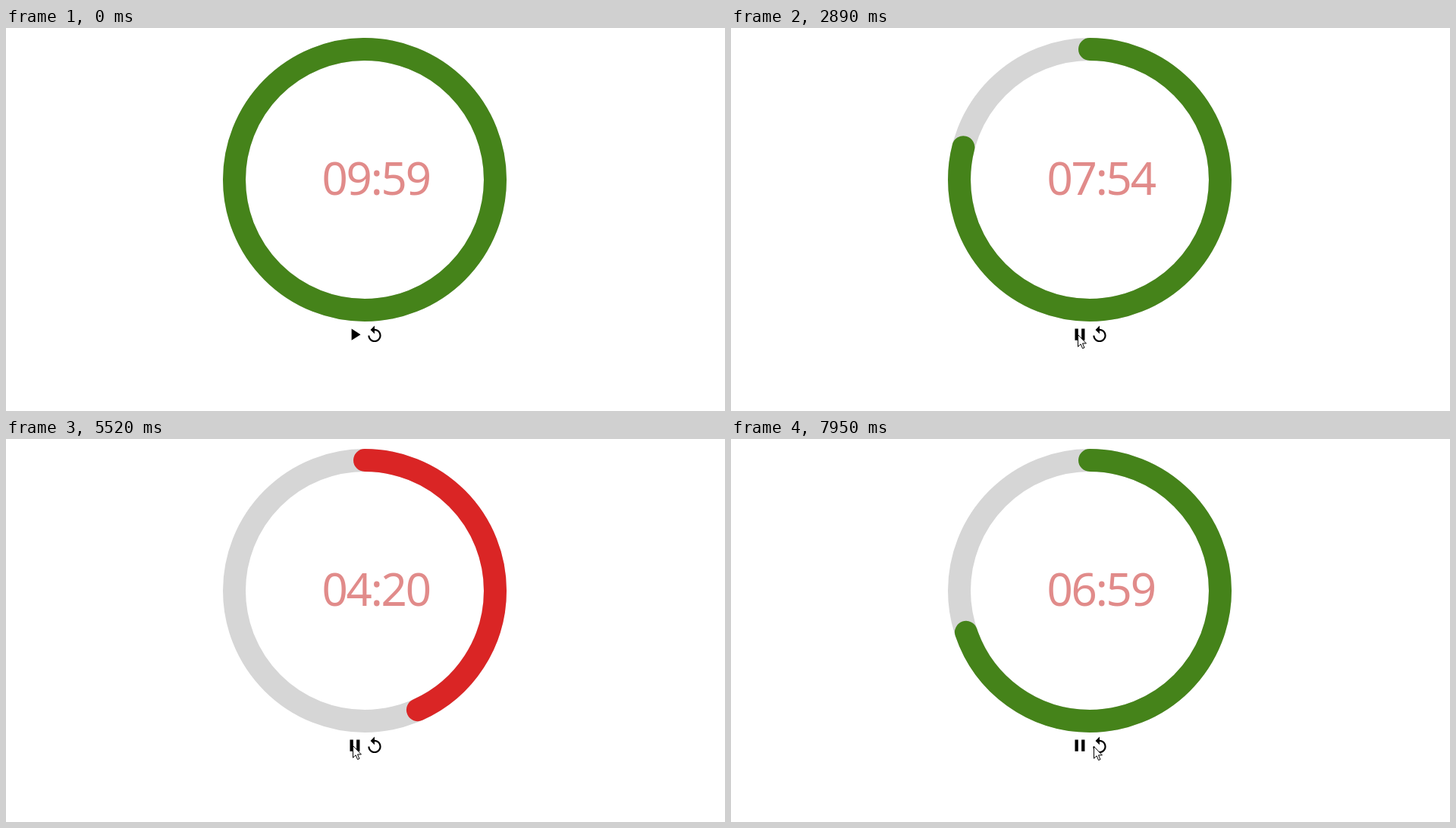
Animation, 948 px wide and 505 px high, one loop 8 s. Source, as an HTML page:

```html
<!DOCTYPE html>
<html lang="en">
<head>
<meta charset="utf-8">
<title>Countdown</title>
<style>
  html, body { margin: 0; width: 100%; height: 100%; overflow: hidden; background: #fff; }
  svg { display: block; }
  .ring { fill: none; stroke-width: 30; }
  text { font: 60px "Noto Sans", "Open Sans", sans-serif; letter-spacing: -2.2px; fill: #e18b8a; }
</style>
</head>
<body>
<svg width="948" height="505" viewBox="0 0 948 505">
  <circle class="ring" cx="473" cy="200" r="172" stroke="#d6d6d6"/>
  <circle class="ring" id="left" cx="473" cy="200" r="172" pathLength="600"
    stroke-linecap="round" transform="rotate(-90 473 200)"/>
  <text id="label" x="416.5" y="219.5"></text>
  <path id="toggle" transform="translate(447 391.2) scale(1.08)"/>
  <path transform="translate(473 391.4) scale(1.08)" d="M12 5V1L7 6l5 5V7c3.31 0 6 2.69 6 6s-2.69 6-6 6-6-2.69-6-6H4c0 4.42 3.58 8 8 8s8-3.58 8-8-3.58-8-8-8z"/>
  <path id="cursor" d="M.5.5V16.2L4.1 12.8 6.6 18.5 9 17.5 6.5 11.9H11.4Z" fill="#fff" stroke="#000"/>
</svg>
<script>
const LOOP = 8000, ENTER = 260, STEP = 69.28;
const PLAY_STEP = 16, RESET_STEP = 84, LIMIT = 599;
const PLAY = 'M8 5v14l11-7z', PAUSE = 'M6 19h4V5H6v14zm8-14v14h4V5h-4z';

const $ = id => document.getElementById(id);
const left = $('left'), label = $('label'), toggle = $('toggle'), cursor = $('cursor');

const pad = n => String(n).padStart(2, '0');
const ramp = (from, to, v) => Math.min(1, Math.max(0, (v - from) / (to - from)));

function secondsLeft(step) {
  const elapsed = step < RESET_STEP ? 5.64 * (step - 15.88) : 5.74 * (step - 79.64);
  return Math.round(LIMIT - Math.max(0, elapsed));
}

// Sweeps in along the bottom, curves up to the toggle, later slides to reset.
function pointer(step) {
  const far = (1 - ramp(0, 12, step)) ** 2;
  const slide = ramp(77, 81, step);
  return [
    459 + 277 * far - 2 * ramp(36, 38, step) + 21 * slide,
    404 + 88 * (1 - (1 - far) ** 4) + slide
  ].map(Math.round);
}

function draw(t) {
  // The picture advances in equal steps, as a screen recording does.
  const step = t < ENTER ? -1 : Math.floor((t - ENTER + 20) / STEP);
  const s = secondsLeft(step);
  label.textContent = pad(Math.floor(s / 60)) + ':' + pad(s % 60);
  left.setAttribute('stroke-dasharray', s + ' 600');
  left.setAttribute('stroke', s > 300 ? '#45831a' : '#da2525');
  toggle.setAttribute('d', step < PLAY_STEP ? PLAY : PAUSE);
  cursor.setAttribute('transform', `translate(${pointer(step)})`);
  cursor.setAttribute('visibility', step < 0 ? 'hidden' : 'visible');
}

const begin = performance.now();
function tick() {
  draw((performance.now() - begin) % LOOP);
  requestAnimationFrame(tick);
}
tick();
</script>
</body>
</html>
```
